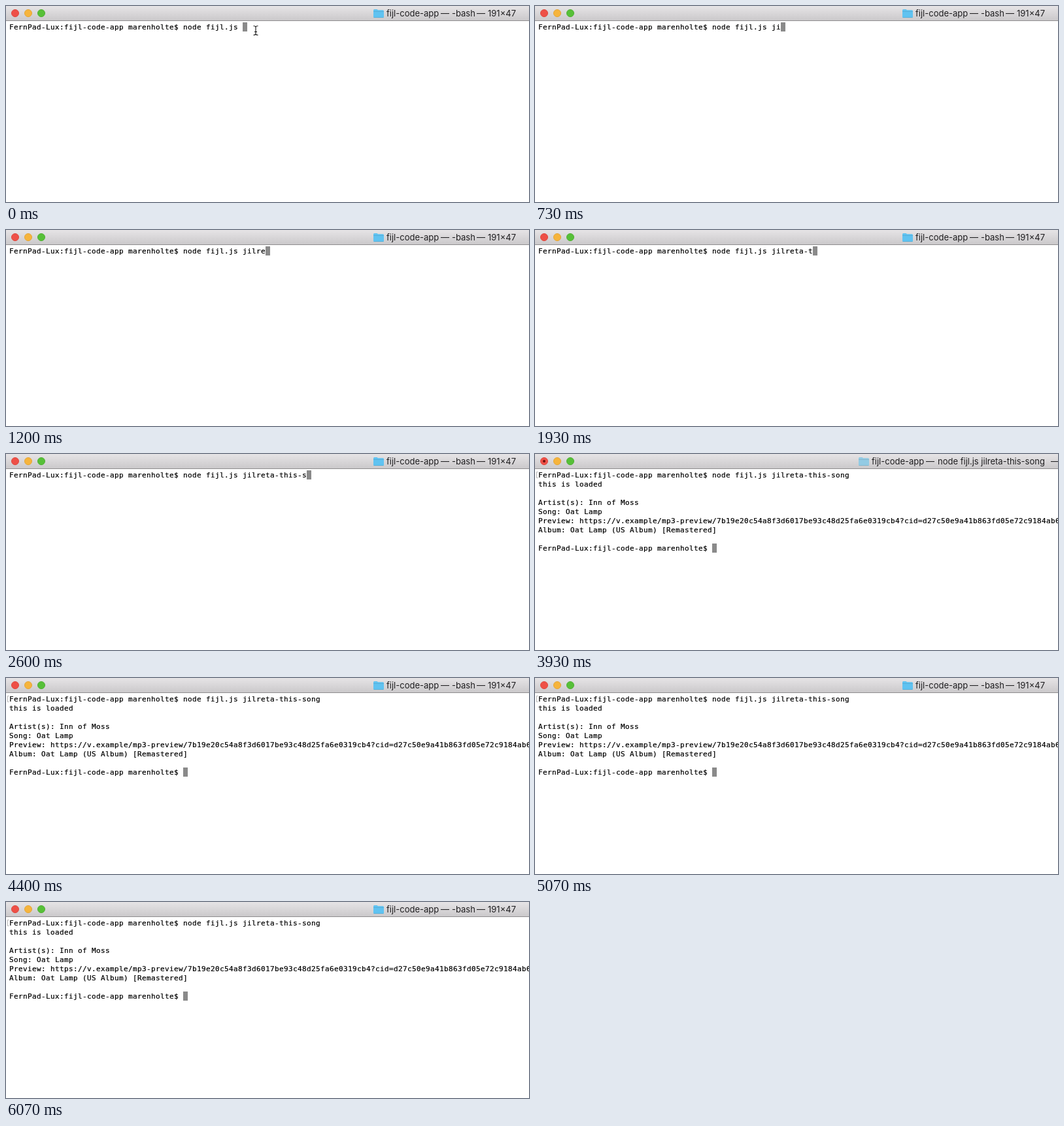
These frames come from a looping animation (800x300 px, 6.14 s). An HTML page:

```html
<!DOCTYPE html>
<html lang="en">
<head>
<meta charset="utf-8">
<title>Terminal</title>
<style>
  html, body { margin: 0; width: 100%; height: 100%; overflow: hidden; background: #fff; }
  svg { display: block; width: 100vw; height: 100vh; }
  text { white-space: pre; }
  .mono { font: 11px "DejaVu Sans Mono", monospace; letter-spacing: .378px; fill: #000; stroke: #000; stroke-width: .22px; }
  .title { font: 13px Inter, sans-serif; fill: #1e1d1f; }
</style>
</head>
<body>
<svg viewBox="0 0 800 300" preserveAspectRatio="none">
  <defs>
    <linearGradient id="bar" x2="0" y2="1">
      <stop offset="0" stop-color="#e6e4e6"/>
      <stop offset="1" stop-color="#cbc9cb"/>
    </linearGradient>
    <g id="folder">
      <path d="M0 1.500q0-1.500 1.500-1.500h4l1.500 1.300h7.500q1.500 0 1.500 1.500v9.200q0 1-1 1h-14q-1 0-1-1z"/>
      <path d="M0 3.500h16M.5 12.500h15" stroke="#000" stroke-opacity=".1" fill="none"/>
    </g>
  </defs>
  <rect width="800" height="300" fill="#fff"/>
  <rect width="800" height="22" fill="url(#bar)"/>
  <rect y="22" width="800" height="1" fill="#8e8d8e"/>
  <g stroke-width="1">
    <circle cx="14" cy="11" r="5.500" fill="#ee5047" stroke="#e0483f"/>
    <circle cx="34" cy="11" r="5.500" fill="#f6b43c" stroke="#e5a636"/>
    <circle cx="54" cy="11" r="5.500" fill="#57c038" stroke="#4eb032"/>
  </g>
  <circle id="dot" cx="14" cy="11" r="2" fill="#6b0f0b"/>
  <g id="idle"><use href="#folder" x="562" y="5" fill="#60c3f1"/></g>
  <g id="busy"><use href="#folder" x="495" y="5" fill="#93cbe4"/></g>
  <path id="mark" d="M4.500 27.500h-2v9h2" fill="none" stroke="#b4b4b4"/>
  <rect id="caret" width="7" height="14" fill="#8a8a8a"/>
  <g id="lines"></g>
  <path id="beam" d="M378.500 30.500q3 0 3.500 1.500q.5-1.500 3.500-1.500M382 32v11M378.500 44.500q3 0 3.500-1.500q.5 1.500 3.500 1.500M380 39.500h4"
        fill="none" stroke="#111" stroke-width="1.100"/>
</svg>
<script>
const LOOP = 6140, COL = 7, ROW = 14, LEFT = 5, TOP = 25;
const $ = id => document.getElementById(id);

const prompt = 'FernPad-Lux:fijl-code-app marenholte$ ';
const command = 'node fijl.js ';
const typed = 'jilreta-this-song';
const keys = [530, 730, 870, 1000, 1130, 1330, 1670, 1730,
              1930, 2000, 2130, 2270, 2470, 2530, 2670, 2800, 2930];
const ENTER = 3200, BUSY = 3270, LOADED = 3600, RESULT = 3870, DONE = 4000;

const result = [
  '',
  'Artist(s): Inn of Moss',
  'Song: Oat Lamp',
  'Preview: https://v.example/mp3-preview/' +
    '7b19e20c54a8f3d6017be93c48d25fa6e0319cb4?cid=d27c50e9a41b863fd05e72c9184ab6',
  'Album: Oat Lamp (US Album) [Remastered]',
  '',
  prompt
];

function addText(parent, cls, x, y, str = '') {
  const el = document.createElementNS('http://www.w3.org/2000/svg', 'text');
  el.setAttribute('class', cls);
  el.setAttribute('x', x);
  el.setAttribute('y', y);
  el.textContent = str;
  parent.append(el);
  return el;
}

const titles = {
  idle: [[582, 'fijl-code-app'], [665, '—'], [682, '-bash'], [720, '—'], [737, '191×47']],
  busy: [[515, 'fijl-code-app'], [598, '—'], [616, command + typed], [789, '—']]
};
for (const id in titles)
  for (const [x, str] of titles[id]) addText($(id), 'title', x, 16, str);

const rows = Array.from({ length: 9 }, (_, i) =>
  addText($('lines'), 'mono', LEFT, TOP + 11 + i * ROW));

function screenAt(t) {
  const count = keys.filter(k => t >= k).length;
  const out = [prompt + command + typed.slice(0, count)];
  if (t >= LOADED) out.push('this is loaded');
  if (t >= RESULT) out.push(...result);
  else if (t >= ENTER) out.push('');
  return out;
}

const show = (id, on) => $(id).setAttribute('visibility', on ? 'visible' : 'hidden');

function draw(t) {
  const out = screenAt(t);
  rows.forEach((row, i) => {
    const str = out[i] || '';
    if (row.textContent !== str) row.textContent = str;
  });
  const last = out.length - 1;
  $('caret').setAttribute('x', LEFT + out[last].length * COL);
  $('caret').setAttribute('y', TOP + last * ROW);

  const busy = t >= BUSY && t < DONE;
  show('busy', busy);
  show('dot', busy);
  show('idle', !busy);
  show('mark', t >= ENTER);
  show('beam', t < keys[0]);
}

const start = performance.now();
function tick() {
  draw((performance.now() - start) % LOOP);
  requestAnimationFrame(tick);
}
tick();
</script>
</body>
</html>
```
